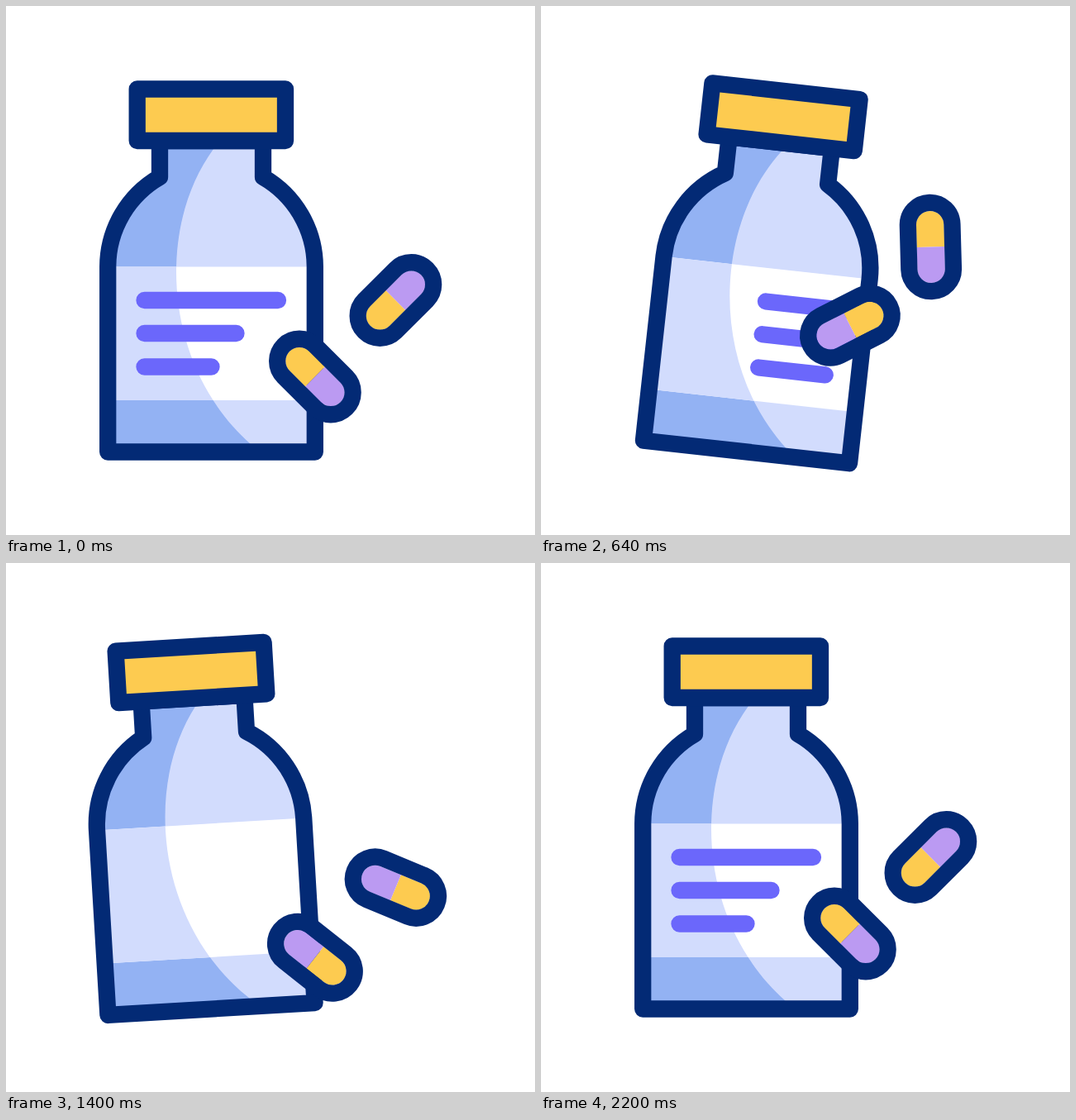
An HTML page for the animation above (2.24 s loop, 640 px wide and 640 px high).

```html
<!DOCTYPE html>
<html lang="en">
<head>
<meta charset="utf-8">
<title>Medicine bottle</title>
<style>
  html, body { margin: 0; width: 100%; height: 100%; overflow: hidden; background: #fff; }
  svg { display: block; width: 100vw; height: 100vh; }
  .ink { fill: none; stroke: #032a75; stroke-width: 20.3; stroke-linejoin: round; }
  .light { fill: #d2dcfd; }
  .mid { fill: #93b2f3; }
  .gold { fill: #fdcb50; }
  .lilac { fill: #bb9af2; }
</style>
</head>
<body>
<svg viewBox="0 0 640 640">
  <defs>
    <path id="body" d="M186 163V207A125.3 125.3 0 0 0 123.2 315V539.5H373.8V315A125.3 125.3 0 0 0 311 207V163Z"/>
    <path id="shade" d="M251 173C222 213 206 265 206 322C206 400 237 478 296 530V541H110V163H258Z"/>
    <clipPath id="inBody"><use href="#body"/></clipPath>
    <clipPath id="inShade"><use href="#shade"/></clipPath>
    <clipPath id="inLabel"><path d="M123 315.5H374V477H123Z"/></clipPath>
    <g id="pill">
      <path class="gold" d="M0-16.8H-26.8a16.8 16.8 0 0 0 0 33.6H0Z"/>
      <path class="lilac" d="M0-16.8H26.8a16.8 16.8 0 0 1 0 33.6H0Z"/>
      <rect class="ink" x="-53.6" y="-26.8" width="107.2" height="53.6" rx="26.8"/>
    </g>
  </defs>
  <g id="bottle">
    <g clip-path="url(#inBody)">
      <use href="#body" class="light"/>
      <use href="#shade" class="mid"/>
      <g clip-path="url(#inLabel)">
        <path fill="#fff" d="M123 315H374V478H123Z"/>
        <use href="#shade" class="light"/>
        <path id="lines" d="M167.5 356H329M167.5 396H278.5M167.5 436.5H248.5" stroke="#6b67fb" stroke-width="20.3" stroke-linecap="round"/>
      </g>
    </g>
    <use href="#body" class="ink"/>
    <path class="ink gold" style="fill:#fdcb50" d="M158.7 100.5H338V163H158.7Z"/>
  </g>
  <use id="pillA" href="#pill"/>
  <use id="pillB" href="#pill"/>
</svg>
<script>
const LOOP = 2240, STEP = 40;

// Keys are [time, value] pairs, eased in and out between neighbours.
const tilt = [[0, 0], [425, -5.1], [785, 12.6], [1245, -7.2], [1731, 8.5], [2200, 0]];
const slideOut = [[425, 0], [920, 210]];
const slideIn = [[1731, -210], [2200, 0]];
const pills = [
  { id: "pillA", x: 373.9, y: 448.5, turn: [[200, 45], [2000, 765]],
    lift: [[200, 0], [730, -67], [1700, 57], [2000, 0]] },
  { id: "pillB", x: 471.4, y: 356, turn: [[200, -45], [1800, 675]],
    lift: [[200, 0], [620, -64.5], [705, -64.5], [1260, 44], [1800, 0]] }
];

function at(keys, t) {
  if (t <= keys[0][0]) return keys[0][1];
  for (let i = 1; i < keys.length; i++) {
    const [t0, a] = keys[i - 1], [t1, b] = keys[i];
    if (t < t1) {
      const p = (t - t0) / (t1 - t0);
      return a + (b - a) * p * p * (3 - 2 * p);
    }
  }
  return keys[keys.length - 1][1];
}

function place(id, transform) {
  document.getElementById(id).setAttribute("transform", transform);
}

const start = performance.now();
function draw() {
  const now = Math.max(0, performance.now() - start) % LOOP;
  const t = Math.floor(now / STEP) * STEP;
  place("bottle", `rotate(${at(tilt, t)} 248.5 539.5)`);
  place("lines", `translate(${at(t < 1300 ? slideOut : slideIn, t)})`);
  for (const { id, x, y, turn, lift } of pills)
    place(id, `translate(${x} ${y + at(lift, t)}) rotate(${at(turn, t)})`);
  requestAnimationFrame(draw);
}
draw();
</script>
</body>
</html>
```
